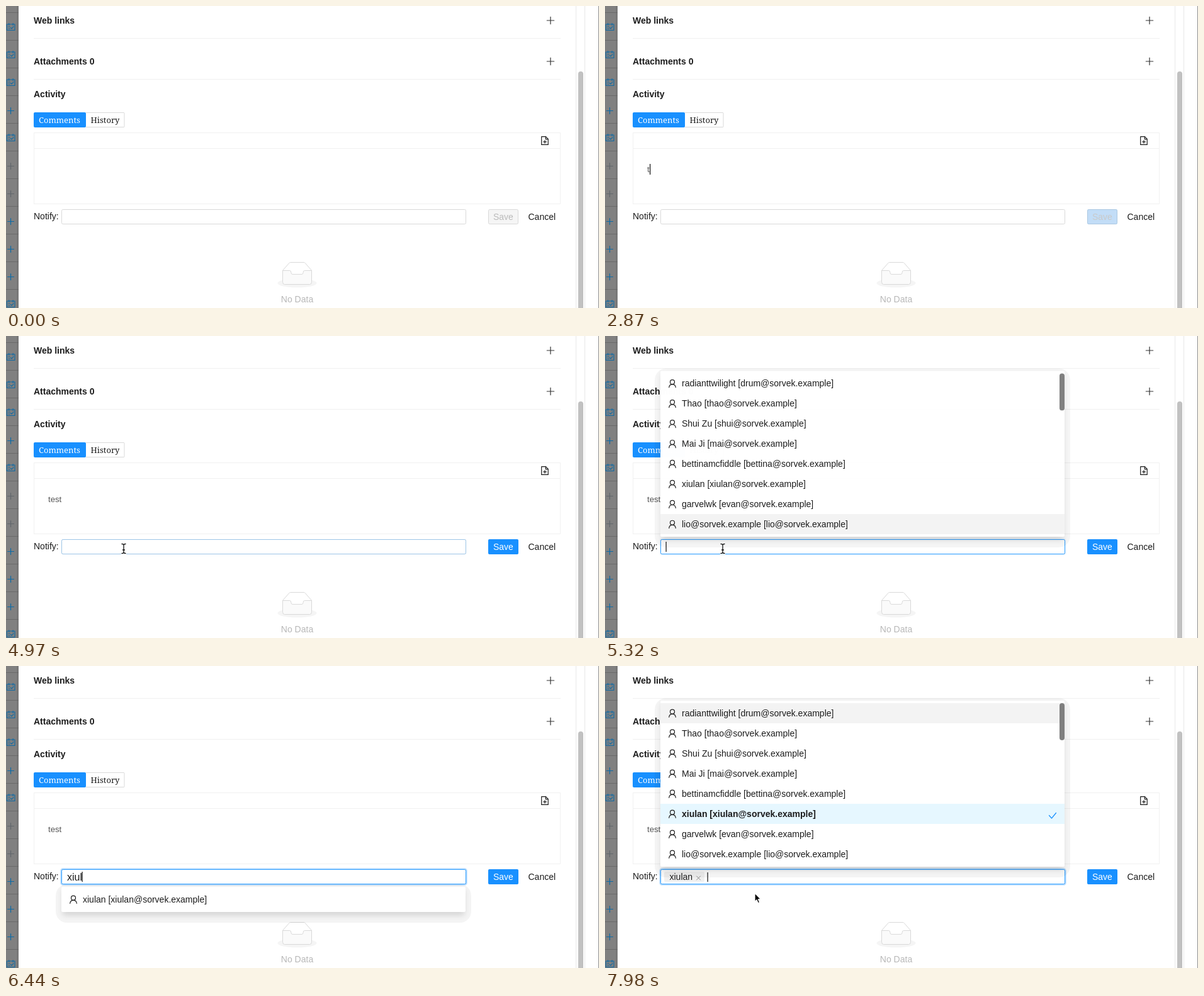
An HTML page that plays this animation: 942 px wide and 480 px high, repeating every 8 s.

```html
<!DOCTYPE html>
<html lang="en">
<head>
<meta charset="utf-8">
<title>Comment notification</title>
<style>
html, body { margin: 0; width: 100%; height: 100%; overflow: hidden; background: #fff; }
svg { display: block; width: 942px; height: 480px; font: 14px "Liberation Sans", Arial, sans-serif; }
.bold { font-weight: 700; }
.serif { font: 13px "Noto Serif", Georgia, serif; }
.line { fill: none; stroke-linecap: round; stroke-linejoin: round; }
</style>
</head>
<body>
<svg viewBox="0 0 942 480" xmlns="http://www.w3.org/2000/svg">
  <defs>
    <filter id="soft" x="-5%" y="-100%" width="110%" height="300%"><feGaussianBlur stdDeviation="5"/></filter>
  </defs>
  <g id="page"></g>
  <g id="live"></g>
</svg>
<script>
const LOOP = 8000, STEP = 70;
const BLUE = '#1890ff', INK = '#1c1c1c';
const page = document.getElementById('page');
const live = document.getElementById('live');

const rect = (x, y, w, h, fill, extra = '') =>
  `<rect x="${x}" y="${y}" width="${w}" height="${h}" fill="${fill}" ${extra}/>`;
const box = (x, y, w, h, stroke, fill = '#fff', r = 0) =>
  rect(x + .5, y + .5, w - 1, h - 1, fill, `stroke="${stroke}" rx="${r}"`);
const text = (x, y, s, fill = INK, extra = '') =>
  `<text x="${x}" y="${y}" fill="${fill}" ${extra}>${s}</text>`;
const stroke = (d, color, width = 1, extra = '') =>
  `<path class="line" d="${d}" stroke="${color}" stroke-width="${width}" ${extra}/>`;
const at = (x, y, body) => `<g transform="translate(${x} ${y})">${body}</g>`;
const plus = (x, y, r, color) =>
  stroke(`M${x - r} ${y}H${x + r}M${x} ${y - r}V${y + r}`, color, 1.2);

const clamp = v => Math.max(0, Math.min(1, v));
const ramp = (t, a, b) => clamp((t - a) / (b - a));
const smooth = p => p * p * (3 - 2 * p);

// ---------- page behind the motion ----------

function sidebar() {
  const calendar = y => at(1.5, y - 6,
    stroke('M1 2H12.5V11.5H0V2ZM3.2 .5V3.5M9.6 .5V3.5M2.4 6H4.5M2.4 9H4.5M6 7.5L7.6 9L10.4 5.7', '#0d6aa5', 1.1));
  let out = rect(0, 0, 20, 480, '#808080') + rect(17, 0, 3, 480, '#787878');
  for (let i = 0; i < 11; i++) out += rect(0, 10 + 44 * i, 20, 1, '#696969');
  [33, 77, 121, 209, 473].forEach(y => out += calendar(y));
  [166, 342, 386, 430].forEach(y => out += plus(7.5, y + .5, 5, '#0d6aa5'));
  [254, 298].forEach(y => out += plus(7.5, y + .5, 5, '#60666b'));
  return out;
}

function emptyState() {
  const tray = 'M9 13H20Q22.4 13 22.4 16Q22.4 18.9 24.6 18.9H39.4Q41.6 18.9 41.6 16Q41.6 13 44 13H55V31Q55 35 52 35H12Q9 35 9 31Z';
  return at(430.5, 407.5,
    '<ellipse cx="32" cy="33" rx="31" ry="7" fill="#f5f5f5"/>' +
    '<path d="M9 22V12.8L19.2 1.2Q20 0 21.1 0H42.9Q44 0 44.8 1.2L55 12.8V22Z" fill="#fff" stroke="#d9d9d9"/>' +
    `<path d="${tray}" fill="#fafafa" stroke="#d9d9d9"/>`) +
    text(462.5, 471, 'No Data', '#b8b8b8', 'text-anchor="middle"');
}

function pageMarkup() {
  return rect(0, 0, 942, 480, '#fff') + sidebar() +
    text(44, 28, 'Web links', INK, 'class="bold"') + plus(865, 23, 5.7, '#333') +
    rect(44, 51, 837, 1, '#f0f0f0') +
    text(44, 93, 'Attachments 0', INK, 'class="bold"') + plus(865, 88, 5.7, '#333') +
    rect(44, 116, 837, 1, '#f0f0f0') +
    text(44, 145, 'Activity', INK, 'class="bold"') +
    box(126, 169, 62.5, 24, '#d9d9d9', '#fff', 1) +
    rect(44, 169, 83, 24, BLUE, 'rx="2"') +
    text(52, 186, 'Comments', '#fff', 'class="serif"') +
    text(134.5, 186, 'History', INK, 'class="serif"') +
    box(44, 201, 837, 114, '#f1f1f1') + rect(44, 226, 837, 1, '#f1f1f1') +
    at(850, 207, stroke('M.7 .7H7.5L11.2 4.4V13.4H.7ZM7.3 .9V4.6H11M6 6.5V11.1M3.7 8.8H8.3', INK, 1.2)) +
    text(44, 339, 'Notify:') + text(829.5, 340, 'Cancel') +
    emptyState() +
    rect(905, 0, 1, 480, '#e8e8e8') + rect(919, 0, 1, 480, '#e8e8e8') +
    rect(909, 104, 8, 390, '#c1c1c1', 'rx="4"') +
    rect(941, 0, 1, 480, '#8e8e8e');
}

// ---------- notify list ----------

const users = [
  ['radianttwilight', 'drum'], ['Thao', 'thao'], ['Shui Zu', 'shui'], ['Mai Ji', 'mai'],
  ['bettinamcfiddle', 'bettina'], ['xiulan', 'xiulan'], ['garvelwk', 'evan'],
  ['lio@sorvek.example', 'lio'], ['Xiwen', 'xiwen'], ['lixian', 'lixian'],
].map(([name, box]) => `${name} [${box}@sorvek.example]`);
const PICK = 'xiulan';

function userRow(label, y, { fill, chosen }) {
  return (fill ? rect(88, y, 642, 32, fill) : '') +
    at(107, y + 16, '<circle cy="-2.3" r="3.5" fill="none" stroke="#222" stroke-width="1.2"/>' +
      stroke('M-5.3 6.3C-4.5 -.2 4.5 -.2 5.3 6.3', '#222', 1.2)) +
    text(122, y + 21, label, INK, chosen ? 'class="bold"' : '') +
    (chosen ? stroke(`M705.5 ${y + 18.5}L709.5 ${y + 23}L716.5 ${y + 14.5}`, BLUE, 1.2) : '');
}

function popup(t) {
  if (t < 5180) return '';
  const picked = t >= 7910;
  const query = picked ? '' : typed(t, search);
  const rows = users.filter(u => u.toLowerCase().includes(query)).slice(0, 8);
  const full = rows.length === 8;
  const h = rows.length * 32 + 8, y = full ? 319 - h : 351;
  const open = 1 - (1 - ramp(t, 5180, 5410)) ** 5;
  const scale = .8 + .2 * open;
  const shade = smooth(ramp(t, 6440, 6580));

  const look = (label, i) => {
    const chosen = picked && label.startsWith(PICK);
    if (chosen) return { chosen, fill: '#e6f7ff' };
    if (picked) return { fill: i === 0 && '#f3f3f3' };
    if (full) return { fill: i === 7 && '#f3f3f3' };
    return { fill: i === 0 && shade > 0 && `rgba(0,0,0,${.045 * shade})` };
  };
  return `<g opacity="${open}" transform="translate(0 ${319 * (1 - scale)}) scale(1 ${scale})">` +
    rect(79, y - 4, 660, h + 21, '#000', 'rx="18" opacity=".045"') +
    rect(90, y + 5, 638, h, '#000', 'opacity=".13" filter="url(#soft)"') +
    rect(88, y, 642, h, '#fff', 'rx="2"') +
    rows.map((label, i) => userRow(label, y + 4 + 32 * i, look(label, i))).join('') +
    (full ? rect(722, 59, 8, 59, '#7f7f7f', 'rx="4"') : '') + '</g>';
}

// ---------- typing ----------

const comment = { word: 'test', times: [2800, 2940, 3080, 3290] };
const search = { word: PICK, times: [6090, 6230, 6370, 6440, 6580, 6720] };
const typed = (t, { word, times }) => word.slice(0, times.filter(k => t >= k).length);

// Caret is lit between each pair of times.
const lit = (t, spans) => spans.some(([a, b]) => t >= a && t < b);
const caret = (x, y, h) => rect(x, y, 1.2, h, '#111');

function editor(t) {
  const word = typed(t, comment);
  const ends = [67, 71, 78.5, 85, 88];
  const on = lit(t, [[1050, 1540], [2030, 2520], [2800, 3850], [4340, 4830]]);
  return text(67, 264, word, '#555', 'font-size="13.2"') +
    (on ? caret(ends[word.length], 251, 17) : '');
}

function saveButton(t) {
  const p = ramp(t, 2800, 3110);
  return box(766, 323, 48, 24, '#d9d9d9', '#f5f5f5', 2) + text(774, 340, 'Save', '#bababa') +
    `<g opacity="${p}">` + rect(766, 323, 48, 24, BLUE, 'rx="2"') + text(774, 340, 'Save', '#fff') + '</g>';
}

const ruler = document.createElement('canvas').getContext('2d');
ruler.font = '16px "Liberation Sans", Arial, sans-serif';

function notifyField(t) {
  const frame = (color, opacity) =>
    rect(88.5, 323.5, 642, 23, 'none', `rx="2" stroke="${color}" opacity="${opacity}"`);
  const glow = ramp(t, 5250, 5550);
  let out = rect(88.5, 323.5, 642, 23, '#fff', 'rx="2"') +
    rect(87.5, 322.5, 644, 25, 'none', `rx="3" stroke="${BLUE}" stroke-width="2.6" opacity="${.3 * glow}"`) +
    frame('#d9d9d9', 1) + frame('#2f9fff', t < 5180 ? .35 * ramp(t, 4830, 4970) : Math.max(.7, ramp(t, 5110, 5320)));
  if (t >= 7770) {
    return out + rect(94, 327, 64, 16, '#f0f0f0', 'rx="2"') + text(102.5, 340, PICK) +
      stroke('M145.5 334L151.5 340M151.5 334L145.5 340', '#8c8c8c') + caret(162.5, 328, 15);
  }
  const word = typed(t, search);
  out += text(97, 341, word, INK, 'font-size="16"');
  if (lit(t, [[5180, 5670], [6090, 7210], [7700, 7770]]))
    out += caret(96.5 + ruler.measureText(word).width, 327, 16);
  return out;
}

// ---------- pointer ----------

const trips = [
  { from: 70, to: 2800, path: [[70, 367, 436], [560, 242, 289], [700, 241, 288], [1260, 244, 244]] },
  { from: 4130, to: 6090, path: [[4130, 176, 296], [4340, 203, 402], [4620, 190, 354], [4760, 190, 354], [4900, 187, 338]] },
  { from: 7210, to: LOOP, path: [[7210, 179, 337], [7630, 160, 368], [7770, 194, 381], [7980, 238, 361]] },
];

function follow(t, path) {
  const next = path.findIndex(k => k[0] > t);
  if (next < 0) return path[path.length - 1].slice(1);
  if (next === 0) return path[0].slice(1);
  const [a, x, y] = path[next - 1], [b, u, v] = path[next];
  const p = smooth(ramp(t, a, b));
  return [x + (u - x) * p, y + (v - y) * p];
}

const outlined = d =>
  `<path d="${d}" fill="#000" stroke="#fff" stroke-width="1.2" stroke-linejoin="round"/>`;
const beamPath = 'M-3 -7.5Q0 -7.5 0 -5.5Q0 -7.5 3 -7.5M0 -5.5V5.5M-3 7.5Q0 7.5 0 5.5Q0 7.5 3 7.5M-1.5 2H1.5';
const shapes = {
  arrow: outlined('M0 0V13.5L3 10.7L5.2 15.8L7.6 14.8L5.4 9.8H9.6Z'),
  beam: stroke(beamPath, '#fff', 3) + stroke(beamPath, '#111', 1.3),
  hand: outlined('M-1.3 1Q0 -1 1.3 1V6L7 7.5Q8.4 8 8 11L7 16H-1.5L-5 10.5Q-5.5 8.5 -3.5 9L-1.3 11Z'),
};

function pointer(t) {
  const trip = trips.find(k => t >= k.from && t < k.to);
  if (!trip) return '';
  const [x, y] = follow(t, trip.path);
  const inEditor = y > 226 && y < 315, inField = y > 323 && y < 347 && x > 88;
  const onOption = t >= 7210 && t < 7910 && y > 354 && y < 388;
  return at(x, y, shapes[inEditor || inField ? 'beam' : onOption ? 'hand' : 'arrow']);
}

// ---------- clock ----------

let shown = -1;
function draw(now) {
  const t = Math.floor((now % LOOP) / STEP) * STEP;
  if (t !== shown) {
    shown = t;
    live.innerHTML = editor(t) + saveButton(t) + notifyField(t) + popup(t) + pointer(t);
  }
}

page.innerHTML = pageMarkup();
const start = performance.now();
draw(0);
(function tick() {
  draw(performance.now() - start);
  requestAnimationFrame(tick);
})();
</script>
</body>
</html>
```
